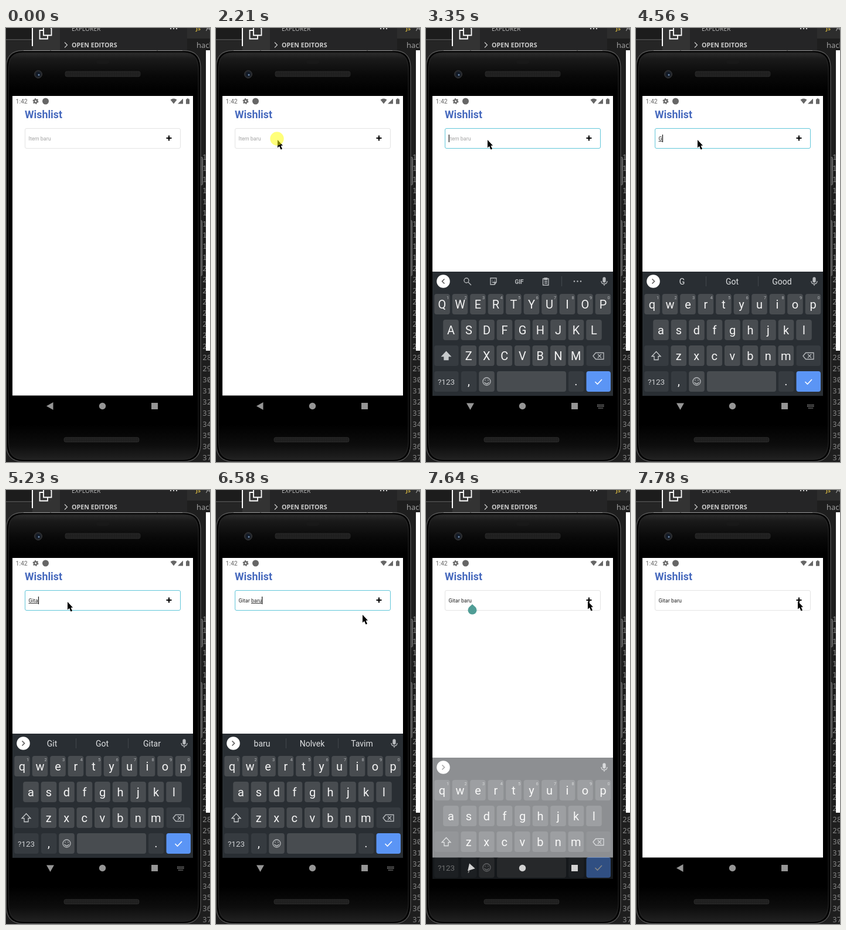
An HTML page that plays this animation: 348x741 px, repeating every 8 s.

```html
<!DOCTYPE html>
<html lang="en">
<head>
<meta charset="utf-8">
<title>Wishlist app demo</title>
<style>
html, body { margin: 0; width: 100%; height: 100%; overflow: hidden; background: #1e1e1e; }
svg { display: block; width: 348px; height: 741px; font-family: Roboto, sans-serif; }
text { white-space: pre; }
.mid { text-anchor: middle; }
.ide { font-family: "Open Sans", "Noto Sans", sans-serif; }
.code { font: 13px "Noto Sans Mono", "DejaVu Sans Mono", monospace; fill: #858585; }
.key { fill: #484c50; }
.side { fill: #363b40; }
.letter { font-size: 20px; fill: #f4f4f4; }
.hint { font-size: 7.5px; fill: #b4b7ba; }
.line { fill: none; stroke: #b9bcbf; stroke-width: 1.3; }
.word { font-size: 14px; fill: #dfe1e3; }
.under { text-decoration: underline; text-decoration-thickness: .7px; }
</style>
</head>
<body>
<svg viewBox="0 0 348 741">
  <defs>
    <linearGradient id="shell" x2="0" y2="1">
      <stop offset="0" stop-color="#333"/><stop offset=".02" stop-color="#1a1a1a"/>
      <stop offset=".06" stop-color="#090909"/><stop offset=".1" stop-color="#000"/>
      <stop offset=".91" stop-color="#000"/><stop offset=".96" stop-color="#0d0d0d"/>
      <stop offset="1" stop-color="#242424"/>
    </linearGradient>
    <pattern id="mesh" width="3" height="3" patternUnits="userSpaceOnUse">
      <rect width="3" height="3" fill="#1d1d1d"/><rect width="1.5" height="1.5" fill="#292929"/>
    </pattern>
    <clipPath id="display"><rect x="11" y="116" width="308" height="548"/></clipPath>
  </defs>

  <!-- editor behind the phone -->
  <rect width="348" height="741" fill="#1e1e1e"/>
  <rect width="45" height="60" fill="#1c1c1c"/>
  <rect y="19" width="45" height="2" fill="#454545"/>
  <rect y="22" width="45" height="40" fill="#252525"/>
  <rect x="45" width="47" height="60" fill="#333"/>
  <rect x="44" width="2" height="31" fill="#fff"/>
  <rect x="92" width="217" height="60" fill="#252526"/>
  <rect x="309" width="39" height="18" fill="#2d2d2d"/>
  <path d="M64-2V12.500H77.500V1L74-3M64 4H57.500V18.500H71V13" fill="none" stroke="#fff" stroke-width="1.800"/>
  <g class="ide">
    <text x="112" y="5" font-size="10.300" fill="#bbb">EXPLORER</text>
    <g fill="#ccc"><circle cx="281" cy="1" r="1.2"/><circle cx="286" cy="1" r="1.2"/><circle cx="291" cy="1" r="1.2"/></g>
    <path d="M100 24.500l4.500 4.500-4.500 4.500" fill="none" stroke="#ccc" stroke-width="1.2"/>
    <text x="112" y="33" font-size="10.700" font-weight="700" fill="#ccc">OPEN EDITORS</text>
    <text x="324" y="4" font-size="9" font-weight="700" fill="#d0b13f">JS</text>
    <text x="341" y="5" font-size="13" fill="#aaa">A</text>
    <text x="325" y="34" font-size="13" fill="#a9a9a9">hack</text>
  </g>
  <g id="lines" class="code"></g>
  <rect x="341" y="38" width="7" height="513" fill="#fff"/>

  <!-- phone -->
  <g fill="#4a4a4a" stroke="#858585" stroke-width=".8">
    <rect x="330" y="220.500" width="5.500" height="47.500" rx="2"/>
    <rect x="330" y="328.500" width="4.500" height="94.500" rx="2"/>
  </g>
  <path d="M.5 66Q1 39 27 38.500H305Q331 39 332 66V712Q331 740 303 740.500H29Q1 740 .5 712Z" fill="url(#shell)" stroke="#666"/>
  <path d="M2.500 710V67Q3 41 28 40.500H304Q329 41 330 67V710Q329 738 303 738.500H29Q3 738 2.500 710Z" fill="none" stroke="#000" stroke-width="2"/>
  <path d="M4.500 708V68Q5 43 29 42.500H303Q327 43 328 68V708Q327 736 302 736.500H30Q5 736 4.500 708Z" fill="none" stroke="#242424"/>
  <path d="M30 38.500H75M77 38.500H257M259 38.500H301" stroke="#959595"/>
  <rect x="154" y="53" width="22" height="8" rx="4" fill="#191919"/>
  <rect x="101" y="74" width="128" height="9" rx="3" fill="url(#mesh)" stroke="#303030" stroke-width=".7"/>
  <rect x="99" y="699" width="128" height="8" rx="3" fill="url(#mesh)" stroke="#303030" stroke-width=".7"/>
  <circle cx="55" cy="79" r="6.500" fill="#24262a" stroke="#35373a"/>
  <circle cx="55" cy="79" r="4" fill="#111a27"/>
  <circle cx="56" cy="80" r="1.500" fill="#7089aa"/>

  <!-- app -->
  <rect x="11" y="116" width="308" height="511.500" fill="#fff"/>
  <g fill="#666">
    <text x="16.500" y="129" font-size="10.500">1:42</text>
    <circle cx="50.500" cy="125" r="2.600" fill="none" stroke="#666" stroke-width="2.200"/>
    <circle cx="50.500" cy="125" r="4.300" fill="none" stroke="#666" stroke-width="1.400" stroke-dasharray="2.250"/>
    <circle cx="67.500" cy="125" r="5.500"/>
    <path d="M280.500 122.500Q286 118.500 291.500 122.500L286 129.500ZM302 120.500V129.500H293ZM307 121.500H308.700V120.300H311.300V121.500H313V129.700H307Z"/>
  </g>
  <text x="32" y="154" font-size="17.800" font-weight="700" fill="#4568bd">Wishlist</text>
  <rect id="box" x="32.500" y="171.500" width="265" height="34" rx="2.500" fill="#fff"/>
  <text id="field" x="38.500" y="192" font-size="9" fill="#222"><tspan id="plain"></tspan><tspan id="active" class="under"></tspan><tspan id="tail"></tspan></text>
  <text id="holder" x="38.500" y="192" font-size="9" fill="#a3a3a3">Item baru</text>
  <rect id="caret" y="182" width="1.200" height="13" fill="#111"/>
  <path d="M278 183.500V192.500M273.500 188H282.500" stroke="#000" stroke-width="2"/>
  <path id="handle" d="M79 195L84.500 200A7.500 7.500 0 1 1 73.500 200Z" fill="#509d96"/>

  <g clip-path="url(#display)">
    <g id="board">
      <rect x="11" y="416" width="308" height="212" fill="#292e33"/>
      <circle cx="29.500" cy="432.500" r="11.300" fill="#fff"/>
      <path id="chevron" d="M2-4L-2 0L2 4" fill="none" stroke="#555" stroke-width="1.500"/>
      <g id="tools" class="line">
        <circle cx="69" cy="431" r="4"/><path d="M72 434L77 439"/>
        <path d="M110 427H120V434L117 438H110ZM120 434H117V438M112.500 433Q114.500 436 117 433M113 430V431M117 430V431"/>
        <text x="159" y="436.500" class="mid" font-size="10" font-weight="700" fill="#b9bcbf" stroke="none">GIF</text>
        <path d="M199.500 428H209V439H199.500ZM202 427H206.500V429.500H202ZM202 432.500H207M202 435.500H207"/>
        <path d="M231.500 424V441" stroke="#41464b"/>
        <path d="M253 432.500H266" stroke-width="2.600" stroke-linecap="round" stroke-dasharray="0 5.500"/>
      </g>
      <g id="words" class="word mid">
        <path d="M119.500 424V441M208.500 424V441" stroke="#41464b"/>
        <text x="78.500" y="438"></text><text x="164" y="438"></text><text x="249" y="438"></text>
      </g>
      <g class="line"><rect x="302" y="426" width="4" height="8" rx="2" fill="#b9bcbf"/><path d="M299 432Q299 437 304 437T309 432M304 437V440"/></g>
      <g id="keys"></g>
      <path id="shift" d="M34.500 552.500L42 560.500H38V566.500H31V560.500H27Z" stroke="#c7cacc" stroke-width="1.300"/>
      <path class="line" d="M285 560L289.500 554.500H303V565.500H289.500ZM293 557L299 563M299 557L293 563"/>
      <g class="line"><circle cx="103.500" cy="603.500" r="6.500"/><path d="M99.500 605Q103.500 610 107.500 605M101 600.500V602M106 600.500V602"/></g>
      <path d="M288.500 604L292.500 608L300 600" fill="none" stroke="#fff" stroke-width="1.600"/>
    </g>
  </g>

  <g id="nav">
    <path id="back" d="M-6.500 0L5-6.500V6.500Z"/>
    <circle cx="164.500" cy="645.500" r="5.700"/>
    <rect x="248" y="640" width="11" height="11"/>
    <path id="mini" d="M292 643.500H304M292 646H304M294 649H302" stroke="#8f8f8f" stroke-width="1.500" stroke-dasharray="1.500 .8" fill="none"/>
  </g>

  <g id="mouse">
    <path d="M0 0V13.500L3 10.800L5.500 16.500L8 15.400L5.600 9.800H9Z" fill="#000"/>
    <circle id="click" cx="-1" cy="-2" r="11.700" fill="#ff0" fill-opacity=".52"/>
  </g>
</svg>
<script>
const LOOP = 8000, STEP = 70;
const $ = id => document.getElementById(id);
const show = (id, on) => $(id).setAttribute('visibility', on ? 'inherit' : 'hidden');
const set = (id, name, value) => $(id).setAttribute(name, value);

let numbers = '';
for (let n = 10; n < 38; n++) numbers += `<text x="335" y="${567 + (n - 28) * 19}">${n}</text>`;
$('lines').innerHTML = numbers;

const keyBox = (x, y, w, cls) => `<rect class="${cls}" x="${x}" y="${y}" width="${w}" height="35" rx="4"/>`;
function buildKeys() {
  let out = '';
  [['qwertyuiop', 27.5], ['asdfghjkl', 42.5], ['zxcvbnm', 72.8]].forEach(([row, start], r) => {
    [...row].forEach((c, i) => {
      const x = start + i * 30.5, y = 454 + r * 44;
      out += keyBox(x - 13.3, y, 26.6, 'key') + `<text class="letter mid" x="${x}" y="${y + 25}">${c}</text>`;
      if (!r) out += `<text class="hint mid" x="${x + 9.5}" y="${y + 9}">${(i + 1) % 10}</text>`;
    });
  });
  out += keyBox(14, 542, 41.5, 'side') + keyBox(273.5, 542, 41.5, 'side') + keyBox(14, 586, 41.5, 'side')
    + keyBox(60, 586, 26.5, 'side') + keyBox(90.2, 586, 26.6, 'key') + keyBox(121, 586, 118, 'key')
    + keyBox(243, 586, 26.5, 'side')
    + '<rect x="273.5" y="586" width="41.5" height="35" rx="4" fill="#5b95f5"/>'
    + '<text class="mid" x="34.5" y="609" font-size="13.5" fill="#cfd1d3">?123</text>'
    + '<text class="letter mid" x="73" y="610">,</text><text class="letter mid" x="256" y="610">.</text>';
  $('keys').innerHTML = out;
}
buildKeys();
const letters = [...document.querySelectorAll('#keys .letter')];
const wordSlots = [...document.querySelectorAll('#words text')];

// time, settled text, underlined text, newest text
const typing = [
  [0, '', '', ''], [4560, '', 'G', ''], [4840, '', 'Gi', ''], [4980, '', 'Git', ''], [5160, '', 'Gita', ''],
  [5430, '', 'Gitar', ''], [5630, 'Gitar ', '', ''], [5700, 'Gitar ', 'b', ''], [5770, 'Gitar ', 'ba', ''],
  [5840, 'Gitar ', 'bar', ''], [5980, 'Gitar ', 'bar', 'u'], [6180, 'Gitar ', 'baru', ''], [7430, 'Gitar baru', '', '']
];
const hints = [
  [0, ''], [4560, 'G Got Good'], [4910, 'Gi Go Git'], [5090, 'Git Got Gitar'], [5300, 'Gita Gitar Git'],
  [5430, 'Gitar Guitar Gitars'], [5630, 'and is for'], [5700, 'be by but'], [5770, 'ba back bar'],
  [5840, 'bar bars bat'], [6180, 'baru Nolvek Tavim']
];
// start time, then one place per step
const moves = [
  [260, [41, 316], [71, 270], [92, 234], [102, 203], [104, 192]],
  [1000, [105, 191]],
  [6440, [126, 193], [196, 206], [250, 213], [261, 221], [265, 224], [265, 216],
    [266, 205], [269, 192], [271, 182], [272, 178], [273, 184], [273, 189]],
  [7290, [276, 190]]
];
// keyboard offset and opacity per step
const opening = [[62, .22], [37, .55], [15, .85], [4, 1], [0, 1]];
const closing = [[0, 1], [0, 1], [0, 1], [4, .95], [18, .8], [41, .53], [64, .22]];

const within = (t, a, b) => t >= a && t < b;
const latest = (list, t) => list.filter(e => e[0] <= t).pop();
const stepOf = (list, t, start) => list[Math.min(list.length - 1, Math.floor((t - start) / STEP))];

function boardState(t) {
  if (!within(t, 2490, 7780)) return [0, 0];
  return t < 7290 ? stepOf(opening, t, 2490) : stepOf(closing, t, 7290);
}

function draw(t) {
  const [, plain, active, tail] = latest(typing, t);
  const typed = plain + active + tail;
  $('plain').textContent = plain;
  $('active').textContent = active;
  $('tail').textContent = tail;
  show('holder', !typed);
  set('box', 'stroke', within(t, 2350, 7430) ? '#61c6d9' : '#e4e4e4');
  set('caret', 'x', 38.7 + (typed ? $('field').getComputedTextLength() : 0));
  show('caret', within(t, 2350, 2820) || within(t, 3350, 3880) || within(t, 4360, 6680) || within(t, 7180, 7360));
  show('handle', within(t, 7360, 7780));

  const [drop, alpha] = boardState(t);
  set('board', 'transform', `translate(0 ${drop})`);
  set('board', 'opacity', alpha);
  const upper = t < 4560;
  letters.forEach(el => {
    el.textContent = upper ? el.textContent.toUpperCase() : el.textContent.toLowerCase();
  });
  set('shift', 'fill', upper ? '#c7cacc' : 'none');
  set('chevron', 'transform', `translate(29.5 432.5) scale(${upper ? 1 : -1} 1)`);
  show('tools', upper);
  show('words', within(t, 4560, 7430));
  const words = latest(hints, t)[1].split(' ');
  wordSlots.forEach((el, i) => { el.textContent = words[i] || ''; });

  set('back', 'transform', `translate(75.5 645.5) rotate(${-90 * alpha})`);
  set('nav', 'fill', alpha > 0 && alpha < 1 ? '#d2d2d2' : '#969696');
  show('mini', alpha === 1);

  const move = latest(moves, t);
  show('mouse', move);
  if (move) set('mouse', 'transform', `translate(${stepOf(move.slice(1), t, move[0])})`);
  show('click', move && (within(t, 2210, 2350) || within(t, 7290, 7430)));
}

const begin = performance.now();
function tick() {
  draw((performance.now() - begin) % LOOP);
  requestAnimationFrame(tick);
}
tick();
</script>
</body>
</html>
```
